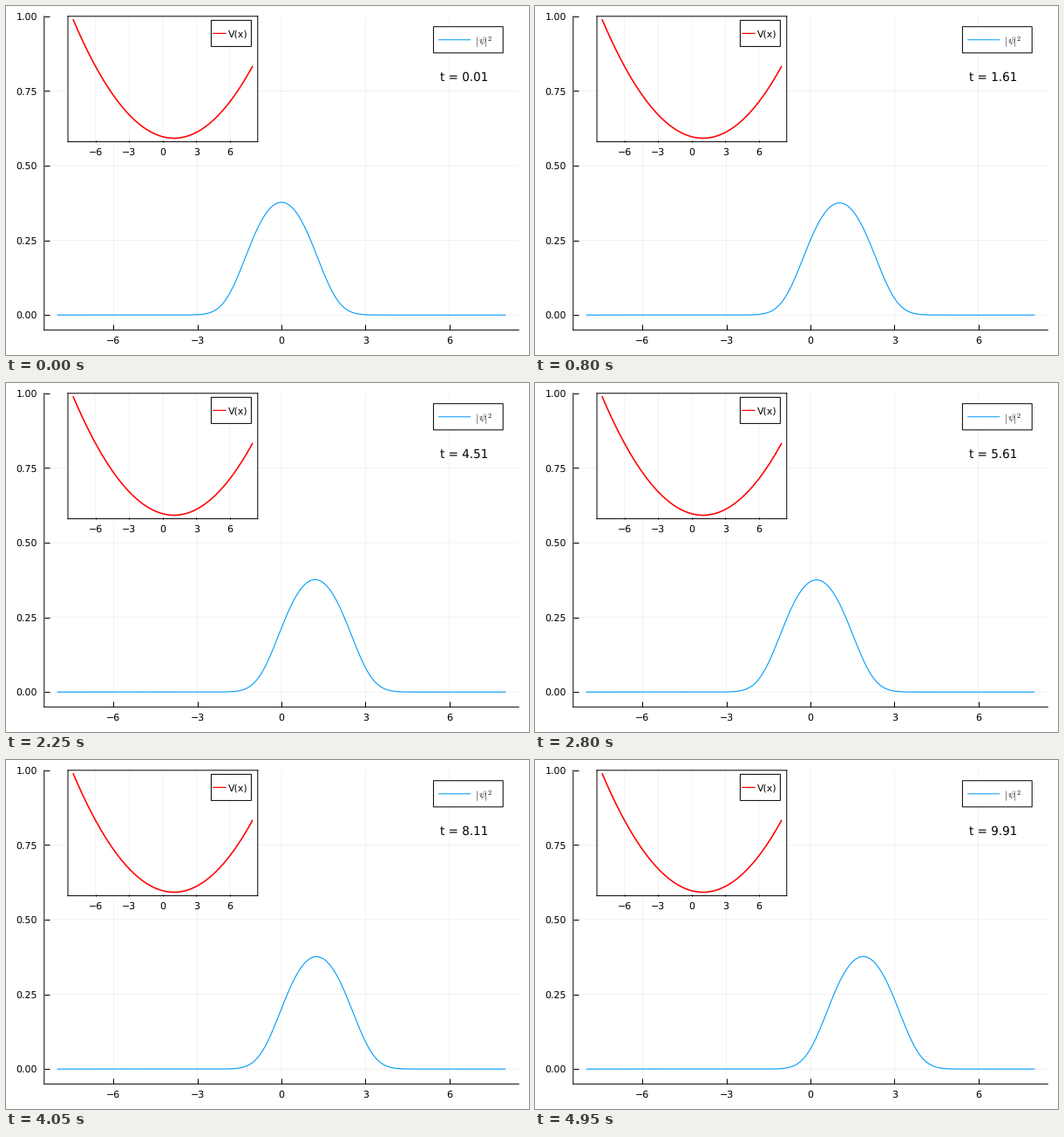
Animation of 600x400 px, one loop 5000 ms. Source, as a matplotlib script:

```python
import matplotlib.pyplot as plt
import numpy as np
from matplotlib.animation import FuncAnimation
from matplotlib.patches import Rectangle

W, H, DPI = 600, 400, 100
PX = 72 / DPI  # one pixel in points
BLUE, RED = "#009afa", "#ff0000"
PEAK = 0.3765  # mean height of the packet
FRAMES, STEP = 100, 0.1
LEFT, TOP, RIGHT, BOTTOM = 43.8, 11.81, 588.19, 371.3

plt.rcParams["font.family"] = "DejaVu Sans"
plt.rcParams["mathtext.fontset"] = "cm"
plt.rcParams["path.snap"] = False
plt.rcParams["text.hinting"] = "none"


def ground_state(peak, n=257):
    """Density of a repulsive condensate in a harmonic trap, solved self-consistently."""
    x = np.linspace(-8, 8, n)
    h = x[1] - x[0]
    kinetic = (np.eye(n) - 0.5 * (np.eye(n, k=1) + np.eye(n, k=-1))) / h**2
    trap = x**2 / 2
    width = 1 / (peak * np.sqrt(np.pi))
    density = peak * np.exp(-(x / width) ** 2)
    g = 5.0
    for _ in range(60):
        _, vectors = np.linalg.eigh(kinetic + np.diag(trap + g * density))
        density = 0.7 * density + 0.3 * vectors[:, 0] ** 2 / h
        g *= density[n // 2] / peak
    return x, density


fig = plt.figure(figsize=(W / DPI, H / DPI), dpi=DPI, facecolor="white")


def add_axes(left, top, right, bottom, zorder):
    box = [left / W, 1 - bottom / H, (right - left) / W, (bottom - top) / H]
    return fig.add_axes(box, zorder=zorder)


def style(ax, tick):
    ax.set_axisbelow(True)
    ax.set_xlim(-8.48, 8.48)
    ax.set_xticks([-6, -3, 0, 3, 6])
    ax.grid(color="black", alpha=0.1, linewidth=0.5 * PX)
    ax.tick_params(direction="in", length=tick * PX, width=PX,
                   labelbottom=False, labelleft=False)
    for spine in ax.spines.values():
        spine.set_linewidth(PX)
        spine.set_snap(False)


main = add_axes(LEFT, TOP, RIGHT, BOTTOM, 1)
style(main, 6)
main.set_ylim(-0.05, 1)
main.set_yticks([0, 0.25, 0.5, 0.75, 1])
main.spines[["top", "right"]].set_visible(False)

# The inset takes 40 % of the main area, starting 5 % from its left edge.
span, rise = RIGHT - LEFT, BOTTOM - TOP
inset = add_axes(LEFT + 0.05 * span, TOP, LEFT + 0.45 * span, TOP + 0.4 * rise, 2)
style(inset, 2.5)
inset.set_ylim(-1.215, 41.715)
inset.set_yticks([])

# Overlay measured in pixels, with y pointing down.
overlay = add_axes(0, 0, W, H, 3)
overlay.set_xlim(0, W)
overlay.set_ylim(H, 0)
overlay.axis("off")


def label(x, y, text, size=11, ha="center"):
    return overlay.text(x, y, text, fontsize=size * PX, ha=ha, va="baseline")


def legend(left, top, right, bottom, line, color, width):
    overlay.add_patch(Rectangle((left, top), right - left, bottom - top, snap=False,
                                facecolor="white", edgecolor="black", linewidth=PX))
    mid = (top + bottom) / 2
    overlay.plot(line, [mid, mid], color=color, linewidth=width * PX)


unit = span / 16.96
for v in (-6, -3, 0, 3, 6):
    name = str(v).replace("-", "\u2212")
    label(LEFT + span / 2 + unit * v, 387, name)
    label(LEFT + 0.25 * span + 0.4 * unit * v, 171, name)
for v in (0, 0.25, 0.5, 0.75, 1):
    label(36, TOP + 4 + rise * (1 - v) / 1.05, f"{v:.2f}", ha="right")

legend(490.4, 23.7, 570.2, 53.8, (496.6, 532.6), BLUE, 1)
label(538, 44, r"$|\,\psi\!|^2$", 11.5, "left")
legend(235.4, 16.4, 281.4, 46.4, (237.8, 252), RED, 1.2)
label(254.7, 35.5, "V(x)", ha="left")

xs = np.linspace(-8, 8, 801)
inset.plot(xs, (xs - 1) ** 2 / 2, color=RED, linewidth=1.6 * PX)
wave, = main.plot([], [], color=BLUE, linewidth=1.1 * PX)
clock = label(497.6, 85.5, "", 13.5, "left")

grid, profile = ground_state(PEAK)


def draw(frame):
    t = 0.01 + STEP * frame
    center = 1 - np.cos(t)
    breath = 1 - 0.003 * np.cos(1.76 * t)
    wave.set_data(xs, np.interp((xs - center) / breath, grid, profile) / breath)
    clock.set_text(f"t = {t:.2f}")
    return wave, clock


anim = FuncAnimation(fig, draw, frames=FRAMES, interval=50, repeat=True, repeat_delay=0)
plt.show()
```
